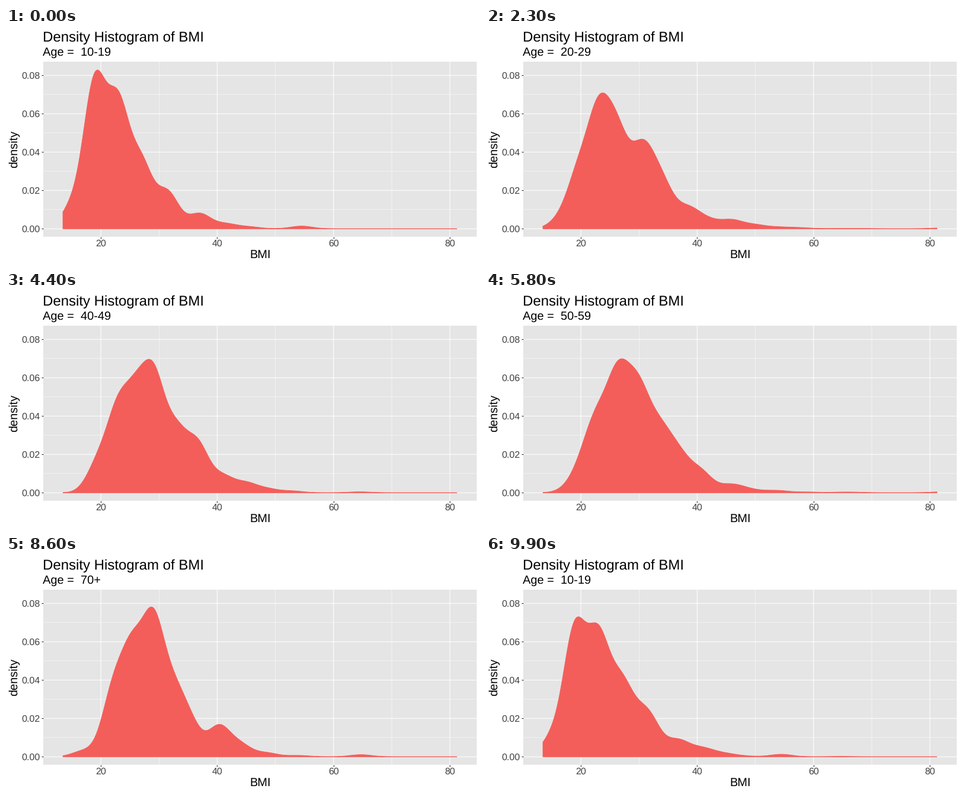
A matplotlib script that plays this animation: 800x400 px, repeating every 10000 ms.

```python
import matplotlib.pyplot as plt
import numpy as np
from matplotlib.animation import FuncAnimation

W, H, DPI = 800, 400, 100
PX = 72 / DPI
LEFT, RIGHT, TOP, BOTTOM = 62.8, 794.5, 57.1, 353.8
X0, X1, Y1 = 13.48, 81.22, 0.0830
KERNEL = 1.9
STEPS = 7
STARTS = [8, 23, 38, 52, 66, 80, 94]
RED, DIM = "#F35E5A", "#404040"

plt.rcParams.update({
    "font.family": "Liberation Sans",
    "text.hinting": "none",
    "path.snap": False,
})

bmi = np.linspace(X0, X1, 680)


def density(*bumps):
    """Kernel sum of (centre, height in thousandths) bumps."""
    return sum(h / 1000 * np.exp(-((bmi - c) / KERNEL) ** 2 / 2)
               for c, h in bumps)


teens = density((15, 10.5), (18.95, 74), (23, 61), (27, 32), (31.5, 18.5),
                (37, 7.8), (41.5, 2.5), (45.5, 1), (54.5, 1.4))
twenties = density((16.5, 5), (19.5, 28), (23, 58), (26.4, 43), (30.7, 38),
                   (34, 21), (38.5, 10), (42.3, 3.5), (46, 4.3), (50, 2),
                   (54, 0.8), (58, 0.5), (82, 0.5))
thirties = density((21, 27.5), (24.9, 62), (28.8, 49), (32.4, 30), (36, 20),
                   (40.5, 13), (45.8, 3.8), (49, 1.8), (53, 0.8), (56.5, 1.3),
                   (64, 0.9), (68.5, 0.9))
forties = density((19.5, 14.5), (22.9, 38), (26.1, 40.5), (29.2, 52.5),
                  (33, 28), (36.7, 23.5), (41, 8), (45, 4.8), (48.7, 1.9),
                  (53, 0.9), (64.5, 0.5))
sixties = density((17, 1), (21.6, 26), (24.2, 16), (26.6, 60), (30.6, 50),
                  (34.3, 30), (37.8, 10), (40.5, 12), (46.7, 4.3), (50.5, 1),
                  (54.3, 1.5), (59, 0.8), (67, 0.5))
seventies = density((17, 3), (22.1, 32), (25.4, 48), (29, 64), (32.4, 28),
                    (35.3, 16), (40.3, 15.5), (44, 6), (48.5, 2), (54, 0.7),
                    (64.7, 1.1))
fifties = (forties + sixties) / 2 + density((82, 0.5))

STATES = [("10-19", teens), ("20-29", twenties), ("30-39", thirties),
          ("40-49", forties), ("50-59", fifties), ("60-69", sixties),
          ("70+", seventies)]

fig = plt.figure(figsize=(W / DPI, H / DPI), dpi=DPI, facecolor="white")
ax = fig.add_axes([LEFT / W, 1 - BOTTOM / H,
                   (RIGHT - LEFT) / W, (BOTTOM - TOP) / H])


def label(x, y, s, size, color="black", **kw):
    return fig.text(x / W, 1 - y / H, s, fontsize=size * PX, color=color,
                    va="baseline", **kw)


def to_px(x, y):
    px = LEFT + (RIGHT - LEFT) * ((x - X0) / (X1 - X0) + 0.05) / 1.1
    py = BOTTOM - (BOTTOM - TOP) * (y / Y1 + 0.05) / 1.1
    return px, py


padx, pady = 0.05 * (X1 - X0), 0.05 * Y1
ax.set(xlim=(X0 - padx, X1 + padx), ylim=(-pady, Y1 + pady),
       facecolor="#E5E5E5", axisbelow=True)
ax.spines[:].set_visible(False)
xticks = np.arange(20, 81, 20)
yticks = np.arange(5) * 0.02
ax.set_xticks(xticks, labels=[])
ax.set_yticks(yticks, labels=[])
ax.set_xticks(xticks[:-1] + 10, minor=True)
ax.set_yticks(yticks[:-1] + 0.01, minor=True)
ax.tick_params(which="major", length=2.75 * PX, width=1.07 * PX,
               color="#2B2B2B")
ax.tick_params(which="minor", length=0)
ax.grid(which="minor", color="white", linewidth=0.53 * PX)
ax.grid(which="major", color="white", linewidth=1.07 * PX)

for v in xticks:
    label(to_px(v, 0)[0], 370, str(v), 16, DIM, ha="center")
for v in yticks:
    label(57.9, to_px(0, v)[1] + 5.4, f"{v:.2f}", 16, DIM, ha="right")
label(LEFT - 0.6, 23, "Density Histogram of BMI", 24)
label((LEFT + RIGHT) / 2, 390.5, "BMI", 20, ha="center")
label(19.4, (TOP + BOTTOM) / 2, "density", 20, ha="center",
      rotation=90, rotation_mode="anchor")
subtitle = label(LEFT - 0.6, 47.7, "", 20)

area, = ax.fill(bmi, teens, facecolor=RED, edgecolor=RED,
                linewidth=PX, zorder=3)


def update(i):
    begun = sum(s <= i for s in STARTS)
    step = min(i - STARTS[begun - 1] + 1, STEPS) if begun else STEPS
    (age0, d0), (age1, d1) = STATES[begun - 1], STATES[begun % len(STATES)]
    y = d0 + (d1 - d0) * step / STEPS
    area.set_xy(np.column_stack([np.r_[X0, bmi, X1], np.r_[0, y, 0]]))
    subtitle.set_text("Age =  " + (age0 if step <= STEPS / 2 + 1 else age1))
    return area, subtitle


anim = FuncAnimation(fig, update, frames=100, interval=100, repeat=True,
                     repeat_delay=0, init_func=lambda: update(0))
plt.show()
```
